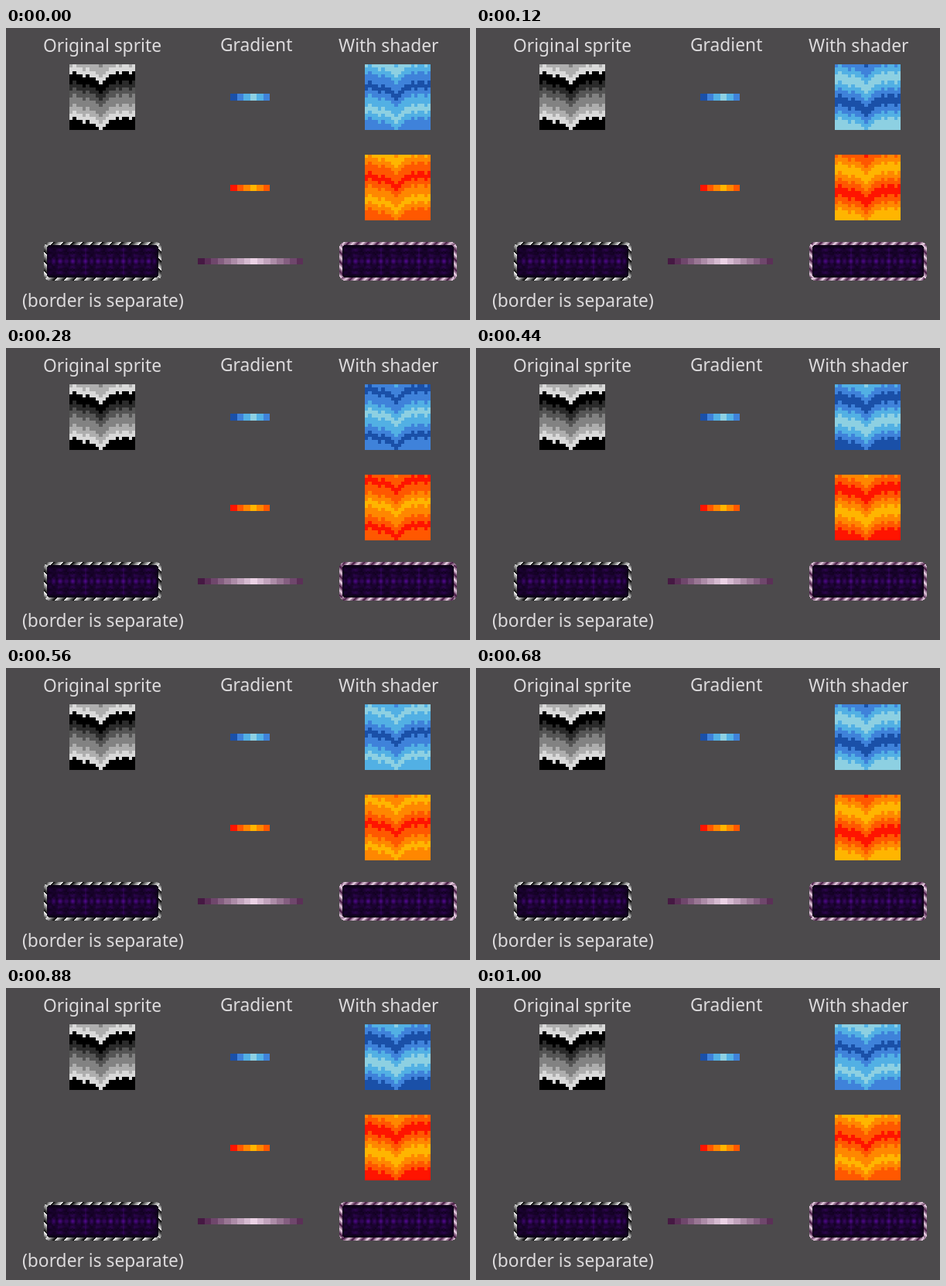
Animation, 600 px wide and 378 px high, one loop 1.04 s. Source, as an HTML page with a canvas:

```html
<!DOCTYPE html>
<html lang="en">
<head>
<meta charset="utf-8">
<title>Palette cycling</title>
<style>
  html, body { margin: 0; width: 600px; height: 378px; overflow: hidden; background: #4c4a4c; }
  canvas, svg { position: absolute; left: 0; top: 0; }
  text { font: 22.8px "Noto Sans", "Open Sans", sans-serif; fill: #dddbdd; }
</style>
</head>
<body>
<canvas id="stage" width="600" height="378"></canvas>
<svg width="600" height="378">
  <text x="48" y="31">Original sprite</text>
  <text x="277" y="30">Gradient</text>
  <text x="430" y="31">With shader</text>
  <text x="21" y="361">(border is separate)</text>
</svg>
<script>
const ctx = document.getElementById("stage").getContext("2d");
const LOOP = 1040, CYCLE = 500, CELL = 4.25;
const mod = (a, n) => ((a % n) + n) % n;
const rgb = c => `rgb(${c.map(Math.round)})`;
const mix = (a, b, k) => a.map((v, i) => v + (b[i] - v) * k);

// Six-entry cyclic palettes: dark to light and back
const mirror = p => [...p, p[2], p[1]];
const blue = mirror(["#1a50a8", "#3f82da", "#52b0e4", "#8dd0e2"]);
const fire = mirror(["#ff1400", "#ff5800", "#ff8700", "#ffb500"]);
const grey = [0, 43, 85, 130, 174, 217].map(v => rgb([v, v, v]));
const pink = Array.from({ length: 16 }, (_, i) =>
  rgb(mix([70, 25, 67], [235, 210, 229], 1 - Math.abs(i - 8) / 8)));
const ramp = Array.from({ length: 16 }, (_, i) => rgb([i * 16, i * 16, i * 16]));

// Wavy bands: a height shift per column, and the row where each level starts
const shift = [0, -1, 0, 0, 1, 0, 1, 1, 2, 3, 2, 1, 0, 0, -1, 0, -1, -1, 0, -1];
const starts = [[-9, 3], [-2, 4], [1, 5], [3, 0], [6, 1], [8, 2], [10, 3], [13, 4], [15, 5], [17, 0]];

function box(x, y, w, h, color) {
  const l = Math.round(x), t = Math.round(y);
  ctx.fillStyle = color;
  ctx.fillRect(l, t, Math.round(x + w) - l, Math.round(y + h) - t);
}

function waves(x, y, colors, offset) {
  shift.forEach((s, col) => starts.forEach(([row, level], i) => {
    const top = Math.max(0, row + s);
    const end = Math.min(20, i < 9 ? starts[i + 1][0] + s : 20);
    if (end > top) box(x + col * CELL, y + top * CELL, CELL, (end - top) * CELL, colors[mod(level + offset, 6)]);
  }));
}

function strip(x, y, colors) {
  colors.forEach((c, i) => box(x + i * 8.5, y, 8.5, 8.5, c));
}

// Rounded frame: depth from the edge, and distance travelled clockwise around it
const W = 152, H = 50, R = 8, EDGE = 4, DASH = 2 * (W + H) / 32;
const border = [], inside = [];
for (let y = 0; y < H; y++) for (let x = 0; x < W; x++) {
  const px = x + .5, py = y + .5;
  const dx = Math.min(px, W - px), dy = Math.min(py, H - py);
  const depth = dx < R && dy < R ? R - Math.hypot(R - dx, R - dy) : Math.min(dx, dy);
  if (depth < 0) continue;
  if (depth >= EDGE) { inside.push([x, y, depth]); continue; }
  const along = dy <= dx
    ? (py < H / 2 ? px : 2 * W + H - px)
    : (px > W / 2 ? W + py : 2 * (W + H) - py);
  border.push([x, y, Math.floor(mod((along + depth) / DASH, 1) * 16)]);
}

function panelColor(x, y, depth) {
  const u = (x - 4) % 49, v = Math.abs(y - 24.5);
  const wave = n => .5 + .5 * Math.cos(u * 2 * Math.PI / n);
  const grain = mod(Math.sin((u >> 1) * 12.9 + (v >> 1) * 78.2) * 43758.5, 1);
  let glow = .15 + .5 * Math.exp(-v * v / 16) * wave(8.2)
    + .28 * Math.cos(v * .42) ** 2 * wave(16.4) + .13 * grain;
  if (u < 2 && x > 10) glow += .13;
  return rgb(mix([7, 0, 14], [74, 8, 132], glow * Math.min(1, (depth - 3) / 6)));
}

function frame(x, y, colors, offset) {
  for (const [px, py, level] of border) box(x + px, y + py, 1, 1, colors[mod(level + offset, 16)]);
}

function drawStill() {
  waves(82, 47, grey, 0);
  strip(290, 85, blue);
  strip(290, 202.5, fire);
  strip(248, 297.5, pink);
  for (const [x, y, depth] of inside) {
    const color = panelColor(x, y, depth);
    for (const left of [49, 431]) box(left + x, 277 + y, 1, 1, color);
  }
  frame(49, 277, ramp, 0);
}

function draw(now) {
  const turns = Math.floor(mod(now, LOOP) / 40) * 40 / CYCLE;
  const offset = 5 - Math.floor(turns * 6 + .68);
  waves(464, 47, blue, offset);
  waves(464, 164, fire, offset);
  frame(431, 277, pink, -Math.floor(turns * 16 + .5));
  requestAnimationFrame(tick);
}

const begin = performance.now();
const tick = () => draw(performance.now() - begin);
drawStill();
draw(0);
</script>
</body>
</html>
```
